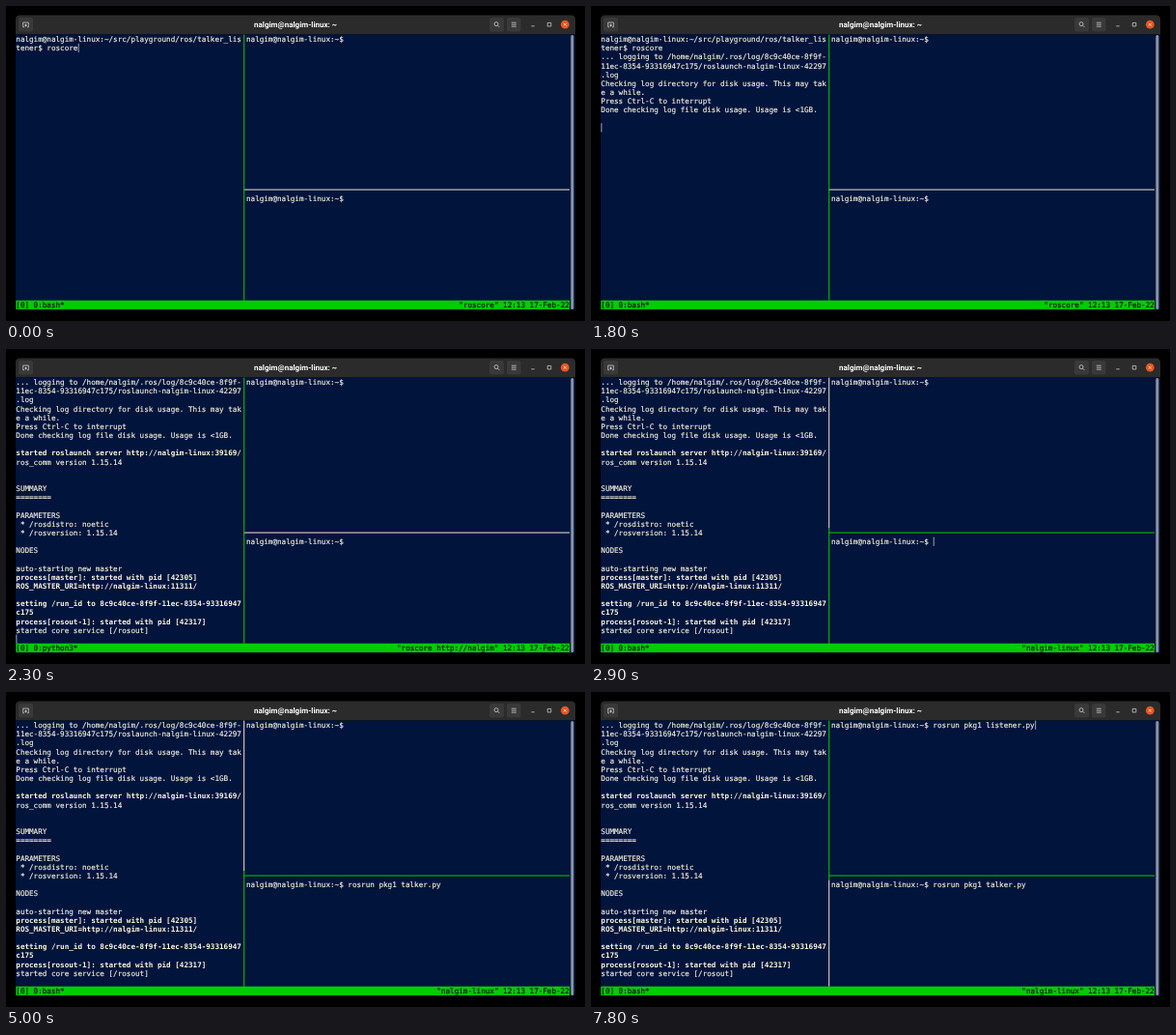
Write an HTML page that moves like this. It is 600 by 326 pixels and loops after 8 s.

```html
<!DOCTYPE html>
<html lang="en">
<head>
<meta charset="utf-8">
<title>Terminal</title>
<style>
  html, body { margin: 0; width: 600px; height: 326px; overflow: hidden; background: #000; }
  svg { display: block; }
  text { white-space: pre; text-rendering: geometricPrecision; }
  #screen { font: 7.624px "DejaVu Sans Mono", monospace; fill: #f4eedb; }
  #screen text { stroke: #f4eedb; stroke-width: .16; }
  #screen .bold { font-weight: bold; fill: #fdf6dc; stroke: none; }
  #screen .status { fill: #001000; stroke: #001000; }
  .title { font: bold 8px Roboto, sans-serif; fill: #fff; text-anchor: middle; }
  .icon { fill: none; stroke: #ddd; stroke-width: .7; }
</style>
</head>
<body>
<svg width="600" height="326">
  <path d="M10 29.5V14q0-4.500 4.500-4.500H585.500q4.500 0 4.500 4.500V29.500Z" fill="#2b2b2b"/>
  <g fill="#393939">
    <rect x="13" y="12" width="15" height="14.500" rx="2"/>
    <rect x="501" y="12" width="15" height="14.500" rx="2"/>
    <rect x="519" y="12" width="14.500" height="14.500" rx="2"/>
  </g>
  <circle cx="579.300" cy="19.200" r="4.400" fill="#e95420"/>
  <g class="icon">
    <path d="M19 21.800H17.700V17H23.300V21.800H22M20.500 18.500V21.500M19 20H22"/>
    <circle cx="508" cy="18.600" r="2"/>
    <path d="M509.500 20.100L511.300 21.900"/>
    <path d="M523.800 17.200H528.800M523.800 19.200H528.800M523.800 21.200H528.800"/>
    <path d="M544.300 20.800H547.700M561.200 17.400H564.800V21H561.200Z"/>
    <path d="M577.900 17.800L580.700 20.600M580.700 17.800L577.900 20.600" stroke="#fff"/>
  </g>
  <text class="title" x="300" y="22.300">nalgim@nalgim-linux: ~</text>
  <rect x="10" y="29.500" width="580" height="285" fill="#00143c"/>
  <rect x="585.300" y="30" width="3" height="284" rx="1.500" fill="#8b93a3"/>
  <g id="screen"></g>
</svg>
<script>
const LOOP = 8000, X0 = 10.3, Y0 = 29.6, CELL_W = 4.59, CELL_H = 9.17, COLS = 125;
const RIGHT = 52, BOTTOM = 18, DIVIDER = 246.7, GREEN = '#00cd00', PALE = '#eee8d5';
const PROMPT = 'nalgim@nalgim-linux:~$ ';

// A leading "!" marks a bold line.
const log = `nalgim@nalgim-linux:~/src/playground/ros/talker_lis
tener$ roscore
... logging to /home/nalgim/.ros/log/8c9c40ce-8f9f-
11ec-8354-93316947c175/roslaunch-nalgim-linux-42297
.log
Checking log directory for disk usage. This may tak
e a while.
Press Ctrl-C to interrupt
Done checking log file disk usage. Usage is &lt;1GB.

!started roslaunch server http://nalgim-linux:39169/
ros_comm version 1.15.14


SUMMARY
========

PARAMETERS
 * /rosdistro: noetic
 * /rosversion: 1.15.14

NODES

auto-starting new master
!process[master]: started with pid [42305]
!ROS_MASTER_URI=http://nalgim-linux:11311/

!setting /run_id to 8c9c40ce-8f9f-11ec-8354-93316947
!c175
!process[rosout-1]: started with pid [42317]
started core service [/rosout]`.split('\n');

// Each track lists [start time, value]; a value holds until the next one.
const printed = [[0, 2], [1700, 5], [1800, 10], [2100, 25], [2300, 31]];
const topInput = [[0, ''], [7300, 'clear'], [7800, 'rosrun pkg1 listener.py']];
const bottomInput = [[0, ''], [3900, 'clear'], [4500, 'rosrun pkg1 talker.py']];
const job = [[0, 'bash'], [2100, 'python3'], [2900, 'bash']];
const paneTitle = [[0, 'roscore'], [2300, 'roscore http://nalgim'], [2500, 'nalgim-linux']];
const activePane = [[0, 'left'], [2500, 'bottom'], [6300, 'top']];
const cursor = [
  [0, [14, 1]], [200, null], [800, [14, 1]], [1400, null], [1500, [0, 2]],
  [1700, [0, 5]], [1800, [0, 10]], [2100, [0, 25]], [2300, [0, 29]],
  [2500, [75, 18]], [3000, null], [3600, [75, 18]], [3900, [80, 18]],
  [4500, [96, 18]], [5000, null], [5500, [52, 19]],
  [6300, [75, 0]], [6900, null], [7300, [80, 0]], [7800, [98, 0]]
];

const at = (track, t) => track.findLast(([start]) => start <= t)[1];
const x = col => X0 + col * CELL_W;
const y = row => Y0 + row * CELL_H;
const rect = (left, top, width, height, fill) =>
  `<rect x="${left}" y="${top}" width="${width}" height="${height}" fill="${fill}"/>`;
const write = (col, row, text, style = '') =>
  `<text class="${style}" x="${x(col)}" y="${y(row) + 7.4}">${text}</text>`;

function borders(active) {
  const upper = active === 'bottom' ? PALE : GREEN;
  const lower = active === 'top' ? PALE : GREEN;
  const across = active === 'left' ? PALE : GREEN;
  const vertical = (from, to, fill) => rect(DIVIDER - .5, y(from), 1, y(to) - y(from), fill);
  return rect(DIVIDER, y(17.5) - .5, x(COLS) - DIVIDER, 1, across) +
    vertical(0, 17, upper) + vertical(17, 18, GREEN) + vertical(18, 30, lower);
}

function render(t) {
  const end = at(printed, t), scroll = Math.max(0, end - 29);
  const status = `"${at(paneTitle, t)}" 12:13 17-Feb-22`;
  const caret = at(cursor, t);
  const lines = log.slice(scroll, end).map((line, row) =>
    line[0] === '!' ? write(0, row, line.slice(1), 'bold') : write(0, row, line));
  return lines.join('') +
    write(RIGHT, 0, PROMPT + at(topInput, t)) +
    write(RIGHT, BOTTOM, PROMPT + at(bottomInput, t)) +
    borders(at(activePane, t)) +
    rect(X0, y(30), COLS * CELL_W, CELL_H, GREEN) +
    write(0, 30, `[0] 0:${at(job, t)}*`, 'status') +
    write(COLS - status.length, 30, status, 'status') +
    (caret ? rect(x(caret[0]) + .2, y(caret[1]), .8, CELL_H, '#c8c8c8') : '');
}

const screen = document.getElementById('screen');
let shown = '';
function frame() {
  const markup = render(performance.now() % LOOP);
  if (markup !== shown) screen.innerHTML = shown = markup;
  requestAnimationFrame(frame);
}
frame();
</script>
</body>
</html>
```
